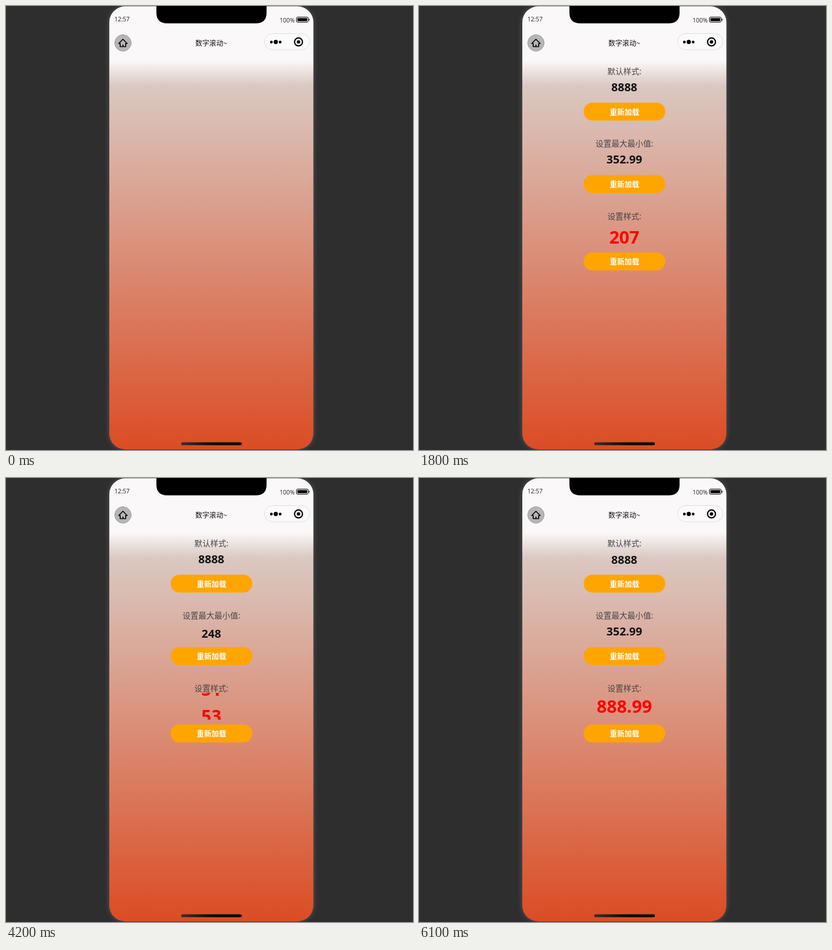
Animation of 717 by 781 pixels, one loop 6200 ms. Source, as an HTML page:

```html
<!DOCTYPE html>
<html lang="zh">
<head>
<meta charset="utf-8">
<title>数字滚动</title>
<style>
  html, body { margin: 0; width: 100%; height: 100%; overflow: hidden; background: #2e2e2e; }
  svg { display: block; }
  #stage { width: 100vw; height: 100vh; }
  text { font-family: "Open Sans", "Noto Sans CJK SC", "Noto Sans CJK", sans-serif; }
  .mid { text-anchor: middle; }
  .cn { font-family: "Noto Sans CJK SC", "Noto Sans CJK", sans-serif; }
  .phone { filter: drop-shadow(0 0 4px #585858); }
  .status { font-size: 10.5px; fill: #222; }
  .label { font-size: 14px; fill: #444; font-weight: 300; }
  .button { font-size: 13px; font-weight: 700; fill: #fff; }
  .number { font-weight: 700; }
</style>
</head>
<body>
<svg id="stage" viewBox="0 0 717 781">
  <defs>
    <linearGradient id="page" x2="0" y2="1">
      <stop offset=".122" stop-color="#faf8f9"/>
      <stop offset=".18" stop-color="#dac8c1"/>
      <stop offset="1" stop-color="#db4c24"/>
    </linearGradient>
    <linearGradient id="bar">
      <stop stop-color="#333"/>
      <stop offset=".6"/>
    </linearGradient>
  </defs>
  <rect class="phone" x="182" y="0.5" width="359.5" height="779.5" rx="28" fill="url(#page)"/>
  <path d="M265 0V12Q265 30.500 284 30.500H440Q459 30.500 459 12V0Z"/>
  <rect x="308.500" y="767.500" width="107" height="5" rx="2.500" fill="url(#bar)"/>

  <text class="status" x="191" y="26.500">12:57</text>
  <text class="status" x="482" y="28.500">100%</text>
  <rect x="511.500" y="19.500" width="21" height="9" rx="2.500" fill="none" stroke="#000"/>
  <rect x="513.300" y="21.300" width="17.400" height="5.400" rx="1"/>
  <path d="M534 22.500q1.500 1.500 0 3z" stroke="#000" stroke-width=".6"/>

  <circle cx="206" cy="65" r="14.500" fill="#b5b5b5" stroke="#9c9c9c"/>
  <path d="M198.500 66L206 58.500L213.500 66H210.800V71.500H201.200V66ZM206 68V71.500" fill="none"
        stroke="#000" stroke-width="1.700" stroke-linejoin="round"/>
  <text class="mid cn" x="361.500" y="69.500" font-size="12.300" fill="#111">数字滚动~</text>
  <rect x="455.500" y="48.500" width="79.500" height="28.500" rx="14.250" fill="#fcfbfb" stroke="#dedddd"/>
  <circle cx="467.500" cy="63.500" r="2.400"/>
  <circle cx="475.200" cy="63.300" r="3.700"/>
  <circle cx="483" cy="63.500" r="2.400"/>
  <circle cx="515.300" cy="63.200" r="7" fill="none" stroke="#000" stroke-width="2.200"/>
  <circle cx="515.300" cy="63.200" r="3"/>
  <g id="content"></g>
</svg>
<script>
const LOOP = 6200, STEP = 100, APPEAR = 400;
const EASE = [.25, .1, .25, 1];
const content = document.getElementById('content');

// Each run: clear = old value vanishes, show = list appears, start/dur = roll.
const rows = [
  { label: '默认样式:', labelY: 120, top: 124, h: 37, base: 150, size: 20, color: '#111', buttonY: 170,
    runs: [
      { clear: 0, show: 450, start: 500, dur: 1000,
        items: [8880, 8883, 8881, 8886, 8882, 8885, 8884, 8881, 8887, 8888] },
      { clear: 5050, show: 5180, start: 5200, dur: 1000,
        items: [8883, 8886, 8881, 8884, 8887, 8888] }
    ] },
  { label: '设置最大最小值:', labelY: 247, top: 251, h: 37, base: 277, size: 20, color: '#111', buttonY: 297.5,
    runs: [
      { clear: 0, show: 450, start: 500, dur: 1000, items: [217, 308, 534, '352.99'] },
      { clear: 4050, show: 4150, start: 4350, dur: 900, from: -.1, items: [248, '352.99'] }
    ] },
  { label: '设置样式:', labelY: 375, top: 378, h: 47, base: 413, size: 31, color: '#f00', buttonY: 433.5,
    runs: [
      { clear: 0, show: 450, start: 480, dur: 3200,
        items: [172, 236, 63, 281, 154, 207, 313, '888.99'] },
      { clear: 3050, show: 3250, start: 3430, dur: 2770, curve: [.38, .07, .14, 1],
        items: [245, 51, 53, 163, '888.99'] }
    ] }
];

function bezier([x1, y1, x2, y2], x) {
  const at = (a, b, s) => 3 * a * s * (1 - s) ** 2 + 3 * b * s * s * (1 - s) + s ** 3;
  let lo = 0, hi = 1;
  for (let i = 0; i < 24; i++) {
    const mid = (lo + hi) / 2;
    if (at(x1, x2, mid) < x) lo = mid; else hi = mid;
  }
  return at(y1, y2, lo);
}

content.innerHTML = rows.map(r => `
  <text class="label cn mid" x="362" y="${r.labelY}">${r.label}</text>
  <svg class="reel" x="182" y="${r.top}" width="360" height="${r.h}">
    ${`<text class="number mid" x="179.700" font-size="${r.size}" fill="${r.color}"></text>`.repeat(2)}
  </svg>
  <rect x="290" y="${r.buttonY}" width="144" height="31.500" rx="15.750" fill="#ffa500"/>
  <text class="button cn mid" x="362" y="${r.buttonY + 20.5}">重新加载</text>`).join('');

const reels = [...content.querySelectorAll('.reel')].map(el => [...el.children]);

function drawRow(row, texts, t) {
  const run = row.runs.filter(r => r.clear <= t).pop();
  const { show, start, dur, items, from = 0, curve = EASE } = run;
  const k = Math.min(1, Math.max(0, (t - start) / dur));
  const eased = k === 0 || k === 1 ? k : bezier(curve, k);
  const pos = from + (items.length - 1 - from) * eased;
  const first = Math.floor(pos);
  texts.forEach((text, i) => {
    text.textContent = t < show ? '' : items[first + i] ?? '';
    text.setAttribute('y', row.base - row.top + (first + i - pos) * row.h);
  });
}

const origin = performance.now();
function draw(now) {
  const t = Math.floor(Math.max(0, now - origin) % LOOP / STEP) * STEP;
  content.style.display = t < APPEAR ? 'none' : '';
  rows.forEach((row, i) => drawRow(row, reels[i], t));
  requestAnimationFrame(draw);
}
draw(origin);
</script>
</body>
</html>
```
